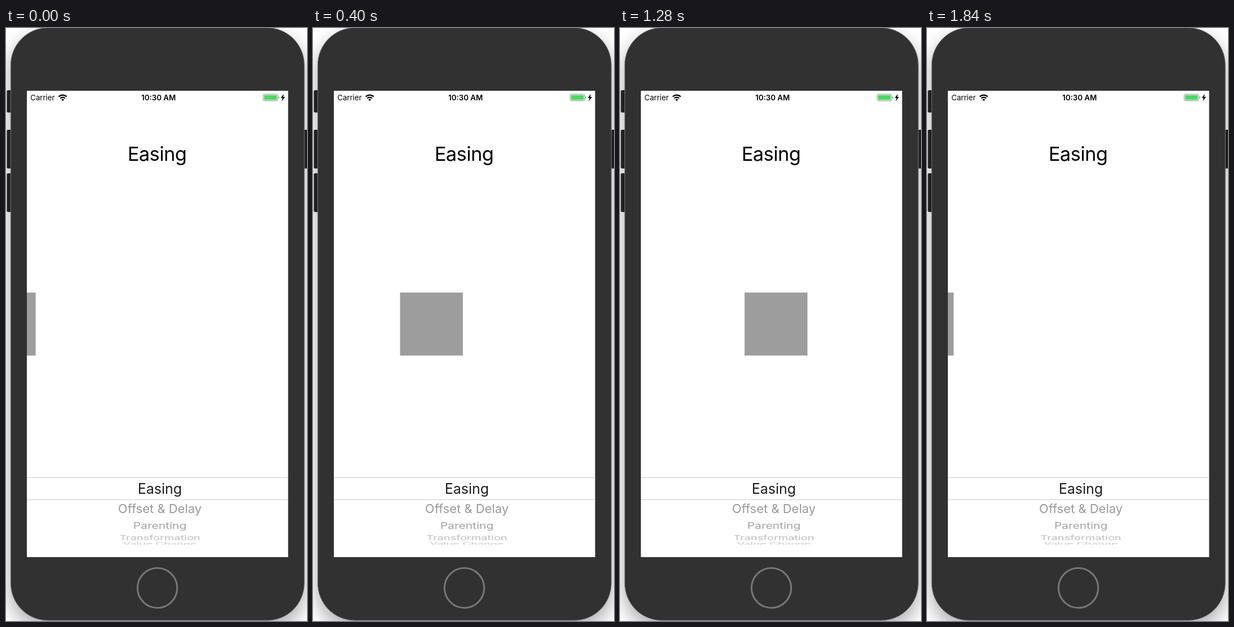
Recreate the animation shown at these times as an HTML page. Size 534x1049 px, loop 1.92 s.

```html
<!DOCTYPE html>
<html lang="en">
<head>
<meta charset="utf-8">
<title>Easing</title>
<style>
  html, body { margin: 0; width: 100%; height: 100%; overflow: hidden; background: #fff; }
  svg { display: block; width: 534px; height: 1049px; font-family: Inter, Roboto, sans-serif; }
  .middle { text-anchor: middle; }
  .picker { text-anchor: middle; }
</style>
</head>
<body>
<svg viewBox="0 0 534 1049">
  <defs>
    <filter id="blur" x="-20%" y="-20%" width="140%" height="140%"><feGaussianBlur stdDeviation="17"/></filter>
    <clipPath id="screen"><rect x="37" y="111" width="463.5" height="825"/></clipPath>
    <clipPath id="wheel"><rect x="37" y="700" width="463.5" height="214"/></clipPath>
  </defs>

  <rect x="8" y="14" width="521.5" height="1048" rx="66" opacity=".34" filter="url(#blur)"/>
  <g fill="#202020">
    <rect x="1.5" y="110" width="10" height="39.5" rx="2"/>
    <rect x="1.5" y="180" width="10" height="68.5" rx="2"/>
    <rect x="1.5" y="257" width="10" height="68.5" rx="2"/>
    <rect x="526" y="180" width="10" height="68.5" rx="2"/>
  </g>
  <rect x="8.4" y="-.4" width="520.8" height="1048.4" rx="66" fill="#313131" stroke="#777" stroke-width="1"/>
  <circle cx="268.5" cy="990.5" r="35.2" fill="none" stroke="#777" stroke-width="3"/>
  <rect x="37" y="111" width="463.5" height="825" fill="#fff"/>

  <text x="43.3" y="128" font-size="13.2">Carrier</text>
  <g fill="none" stroke="#000" stroke-width="2.2">
    <path d="M93.6 121.6a9.7 9.7 0 0 1 14 0"/>
    <path d="M96.3 124.5a6 6 0 0 1 8.6 0"/>
  </g>
  <path d="M100.6 129.2l-2.5-2.6a3.6 3.6 0 0 1 5 0z"/>
  <text class="middle" x="270.7" y="128" font-size="13.3" font-weight="600">10:30 AM</text>
  <rect x="456.2" y="117.2" width="25.8" height="11.6" rx="2.6" fill="none" stroke="#8a8a8a"/>
  <rect x="457.8" y="118.8" width="22.6" height="8.4" rx="1.3" fill="#4cd964"/>
  <path d="M483.3 121q1.6 .5 1.6 2t-1.6 2z" fill="#8a8a8a"/>
  <path d="M492.8 116.5l-5.3 7.2h3.2l-1.6 5.8 6-7.4h-3.3z"/>

  <text class="middle" x="268" y="235.4" font-size="34.5" letter-spacing="-.6">Easing</text>

  <g clip-path="url(#screen)">
    <rect id="box" y="468" width="111.5" height="111.5" fill="#9d9d9d"/>
  </g>

  <path d="M37 795.5h463.5M37 834.5h463.5" stroke="#cbcbcb"/>
  <g class="picker" clip-path="url(#wheel)">
    <text x="273" y="824.4" font-size="25" fill="#1c1c1c">Easing</text>
    <text x="273" y="858" font-size="22" fill="#999">Offset &amp; Delay</text>
    <text transform="translate(273 886) scale(1 .77)" font-size="21" fill="#a2a2a2">Parenting</text>
    <text transform="translate(273 906) scale(1 .58)" font-size="20" fill="#bcbcbc">Transformation</text>
    <text transform="translate(273 915.3) scale(1 .36)" font-size="20" fill="#c6c6c6">Value Change</text>
  </g>
</svg>
<script>
  const LOOP = 1920, STEP = 80;
  const LEFT = -74.5, CENTER = 213, RIGHT = 500.5;
  const box = document.getElementById('box');

  // cubic-bezier(.4, 0, .2, 1)
  function standardEase(x) {
    if (x <= 0) return 0;
    if (x >= 1) return 1;
    let low = 0, high = 1, s;
    for (let i = 0; i < 24; i++) {
      s = (low + high) / 2;
      const along = 1.2 * (1 - s) ** 2 * s + 0.6 * (1 - s) * s * s + s ** 3;
      if (along < x) low = s; else high = s;
    }
    return s * s * (3 - 2 * s);
  }

  const move = (from, to, progress) => from + (to - from) * standardEase(progress);
  const enter = t => move(LEFT, CENTER, (t + 146) / 1056);
  const exit = t => move(CENTER, RIGHT, (t - 1166) / 1101);

  function position(t) {
    if (t < 1280) return enter(t);
    if (t < 1840) return exit(t);
    return enter(-24); // re-enters before the loop closes
  }

  const start = performance.now();
  function draw() {
    const t = (performance.now() - start) % LOOP;
    box.setAttribute('x', position(Math.floor(t / STEP) * STEP).toFixed(2));
    requestAnimationFrame(draw);
  }
  draw();
</script>
</body>
</html>
```
